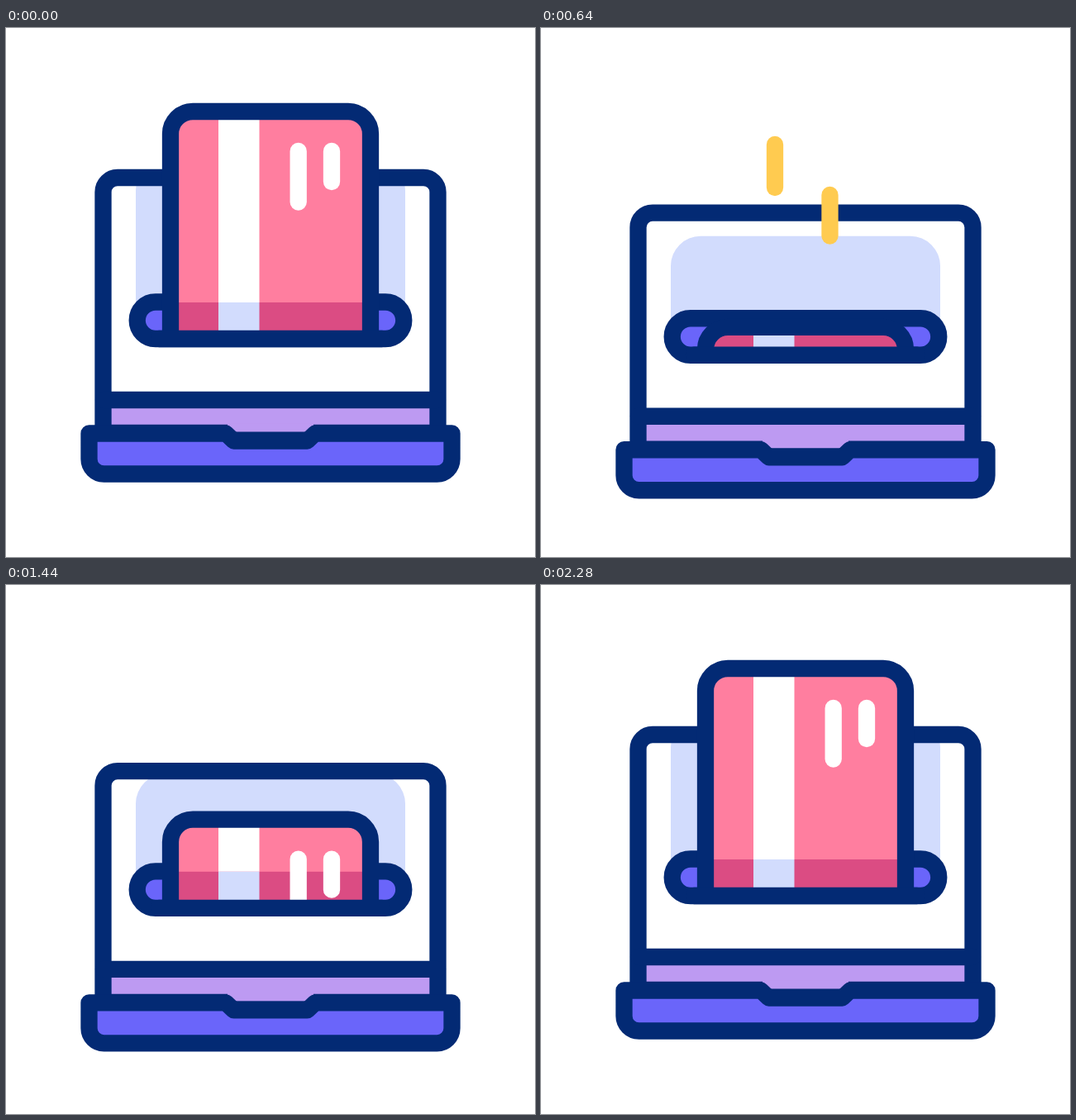
Animation of 640x640 px, one loop 3000 ms. Source, as an HTML page with a canvas:

```html
<!DOCTYPE html>
<html lang="en">
<head>
<meta charset="utf-8">
<title>Laptop card slot</title>
<style>
  html, body { margin: 0; height: 100%; overflow: hidden; background: #fff; }
  canvas { display: block; width: 640px; height: 640px; }
</style>
</head>
<body>
<canvas width="640" height="640"></canvas>
<script>
const ctx = document.querySelector('canvas').getContext('2d');
const NAVY = '#032a74', PINK = '#ff7e9f', ROSE = '#db4c83', SKY = '#d2dcfd';
const VIOLET = '#6a65fa', LILAC = '#bd9af2', YELLOW = '#ffcb50', WHITE = '#fff';
const LOOP = 3000, STEP = 40, LAST = 2280;

// Burst rays: inner point, then direction and length
const RAYS = [
  [199, 60, -6, -17], [174, 97, -27, -15], [154, 136, -19, 2],
  [447.5, 57, 8.5, -19], [470, 94, 27, -15], [488, 134, 17.5, 4.5]
];

const clamp = v => Math.min(1, Math.max(0, v));
const smooth = s => s * s * (3 - 2 * s);

// cubic-bezier(.4, 0, .2, 1)
function ease(x) {
  let lo = 0, hi = 1;
  for (let i = 0; i < 24; i++) {
    const s = (lo + hi) / 2, r = 1 - s;
    if (1.2 * s * r * r + 0.6 * s * s * r + s ** 3 < x) lo = s; else hi = s;
  }
  return smooth(lo);
}

const part = (t, start, length) => clamp((t - start) / length);
// Goes 0 to 1 and back to 0
const trip = (t, out, outLen, back, backLen) =>
  ease(part(t, out, outLen)) - ease(part(t, back, backLen));

function rect(color, x, y, w, h) {
  ctx.fillStyle = color;
  ctx.fillRect(x, y, w, h);
}

function line(color, ...p) {
  ctx.beginPath();
  for (let i = 0; i < p.length; i += 2) ctx.lineTo(p[i], p[i + 1]);
  ctx.strokeStyle = color;
  ctx.stroke();
}

function box(x, y, w, h, r) {
  ctx.beginPath();
  ctx.roundRect(x, y, w, h, r);
}

function paint(fill, stroke) {
  if (fill) { ctx.fillStyle = fill; ctx.fill(); }
  if (stroke) { ctx.strokeStyle = stroke; ctx.stroke(); }
}

function clipped(x, y, w, h, draw) {
  ctx.save();
  ctx.beginPath();
  ctx.rect(x, y, w, h);
  ctx.clip();
  draw();
  ctx.restore();
}

function drawScreen(drop, top, panel) {
  box(117.5, top, 405, 500 + drop - top, [17.5, 17.5, 0, 0]);
  paint(WHITE);
  clipped(117, top, 406, 354 + drop - top, () => {
    box(157, panel, 326, 300, 36);
    paint(SKY);
  });
  rect(LILAC, 118, 450 + drop, 404, 45);
  box(117.5, top, 405, 490 + drop - top, [17.5, 17.5, 0, 0]);
  paint(null, NAVY);
  line(NAVY, 118, 450 + drop, 522, 450 + drop);
}

function drawBase(drop) {
  const y = 490.5 + drop;
  // Lilac shows in the notch, above the base outline
  rect(LILAC, 268, y - 12, 104, 10);
  ctx.beginPath();
  ctx.moveTo(100.5, y);
  ctx.lineTo(266, y);
  ctx.lineTo(275.5, y + 9);
  ctx.lineTo(364.5, y + 9);
  ctx.lineTo(374, y);
  ctx.lineTo(539.5, y);
  ctx.arcTo(539.5, y + 49, 500, y + 49, 18);
  ctx.arcTo(100.5, y + 49, 100.5, y, 18);
  ctx.closePath();
  paint(VIOLET, NAVY);
}

function drawSlot(drop) {
  box(158.7, 331.5 + drop, 322.6, 44.5, 22.25);
  paint(VIOLET, NAVY);
}

function drawCard(drop, y) {
  const floor = 376 + drop, shade = 332 + drop;
  clipped(0, 0, 640, floor, () => {
    ctx.save();
    box(199, y, 242, 400, 27);
    ctx.clip();
    rect(PINK, 199, y, 242, 400);
    rect(WHITE, 257, y, 49.5, 400);
    rect(ROSE, 199, shade, 242, 60);
    rect(SKY, 257, shade, 49.5, 60);
    ctx.restore();
    line(WHITE, 353.7, y + 48, 353.7, y + 109.5);
    line(WHITE, 394, y + 48, 394, y + 85);
    box(199, y, 242, 400, 27);
    paint(null, NAVY);
  });
  line(NAVY, 185, floor, 455, floor);
}

// Grows from its start, then shrinks towards its end
function streak(x, from, to, t, start) {
  const head = part(t, start - 146, 146), tail = part(t, start, 146);
  if (head <= 0 || tail >= 1) return;
  line(YELLOW, x, from + (to - from) * tail, x, from + (to - from) * head);
}

function drawBurst(t) {
  const head = 1.63 * part(t, 1580, 163), tail = 1.63 * part(t, 1680, 163);
  if (head <= 0 || tail >= 1.63) return;
  for (const [x, y, dx, dy] of RAYS)
    line(YELLOW, x + dx * tail, y + dy * tail, x + dx * head, y + dy * head);
}

function draw(t) {
  const drop = 25.5 * trip(t, 290, 702, 1256, 577);
  const top = 181 + 64 * trip(t, 321, 746, 1233, 742);
  const panel = 160 + 212 * trip(t, 400, 740, 1160, 646);
  const lift = smooth(part(t, 0, 332)) - smooth(part(t, 1814, LAST - 1814));
  const card = 101 - 14 * lift + 323 * trip(t, 332, 540, 1273, 541);

  rect(WHITE, 0, 0, 640, 640);
  ctx.lineWidth = 20.3;
  ctx.lineCap = ctx.lineJoin = 'round';
  drawScreen(drop, top, panel);
  drawSlot(drop);
  drawCard(drop, card);
  drawBase(drop);
  streak(283, 141, 256, t, 720);
  streak(349.5, 202, 286, t, 700);
  drawBurst(t);
}

function tick() {
  const t = performance.now() % LOOP;
  draw(Math.min(LAST, Math.floor(t / STEP) * STEP));
  requestAnimationFrame(tick);
}
tick();
</script>
</body>
</html>
```
